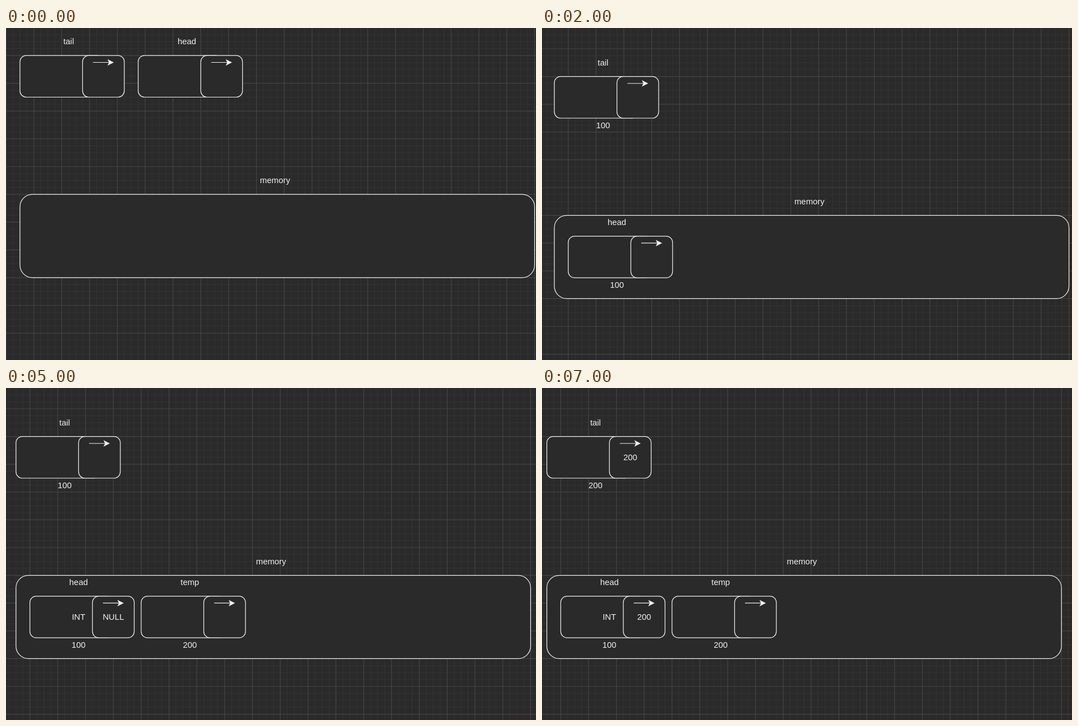
An HTML page for the animation above (8 s loop, 945 px wide and 593 px high).

```html
<!DOCTYPE html>
<html>
<head>
<meta charset="utf-8">
<title>Linked list in memory</title>
<style>
  html, body { margin: 0; width: 100%; height: 100%; overflow: hidden; background: #2a2a2a; }
  svg { display: block; }
  text { font: 12px "Liberation Sans", Arial, sans-serif; fill: #f0f0f0; text-anchor: middle; }
  rect { fill: #2a2a2a; stroke: #f0f0f0; }
  .arrow { fill: #f0f0f0; stroke: #f0f0f0; stroke-miterlimit: 10; }
  .minor { stroke: #323232; }
  .major { stroke: #444; }
</style>
</head>
<body>
<svg width="945" height="593" viewBox="0 0 945 593"><g id="scene"></g></svg>
<script>
const scene = document.getElementById('scene');
const SCALE = 1.24, STEP = 1000;

const text = (x, y, s) => s ? `<text x="${x}" y="${y + 4.16}">${s}</text>` : '';
const box = (x, y, w, h) =>
  `<rect x="${x}" y="${y}" width="${w}" height="${h}" rx="${h * 0.15}"/>`;

function node(x, y, name, { data, next, addr } = {}) {
  return `<g transform="translate(${x} ${y})">` +
    box(0, 0, 120, 60) + box(90, 0, 60, 60) +
    '<path class="arrow" d="M105 10H128.6M133.88 10l-7 3.5 1.75-3.5-1.75-3.5z"/>' +
    text(70, -10 - 10, name) + text(70, 30, data) +
    text(120, 30, next) + text(70, 70, addr) + '</g>';
}

function grid() {
  let minor = '', major = '';
  for (let i = -10; i < 80; i++) {
    const v = `M${i * 10 + 20} -100V500`, h = `M-60 ${i * 10}H800`;
    if (i % 4) minor += v + h; else major += v + h;
  }
  return `<path class="minor" d="${minor}"/><path class="major" d="${major}"/>`;
}

// One entry per second: view offset and the contents of each node.
const start = { x: 24.9, y: 49.1, tail: {} };
const steps = [start];
const then = change => steps.push({ ...steps[steps.length - 1], ...change });
then({ x: 23.4, y: 86.6, head: { addr: 100 } });
then({ x: 22, tail: { addr: 100 } });
then({ x: 20.6, head: { addr: 100, data: 'INT' } });
then({ x: 19.2, head: { addr: 100, data: 'INT', next: 'NULL' } });
then({ x: 17.8, temp: { addr: 200 } });
then({ x: 10, tail: { addr: 100, next: 200 }, head: { addr: 100, data: 'INT', next: 200 } });
then({ x: 8.6, tail: { addr: 200, next: 200 } });

const background = grid();
let shown = -1;

function draw(i) {
  const s = steps[i];
  scene.setAttribute('transform', `translate(${s.x} ${s.y}) scale(${SCALE})`);
  scene.innerHTML = background +
    node(0, 0, 'tail', s.tail) +
    box(0, 200, 740, 120) + text(366.8, 180, 'memory') +
    (s.head ? node(20, 230, 'head', s.head) : node(170, 0, 'head')) +
    (s.temp ? node(180, 230, 'temp', s.temp) : '');
}

function tick(now) {
  const i = Math.floor(now / STEP) % steps.length;
  if (i !== shown) draw(shown = i);
  requestAnimationFrame(tick);
}
tick(0);
</script>
</body>
</html>
```
